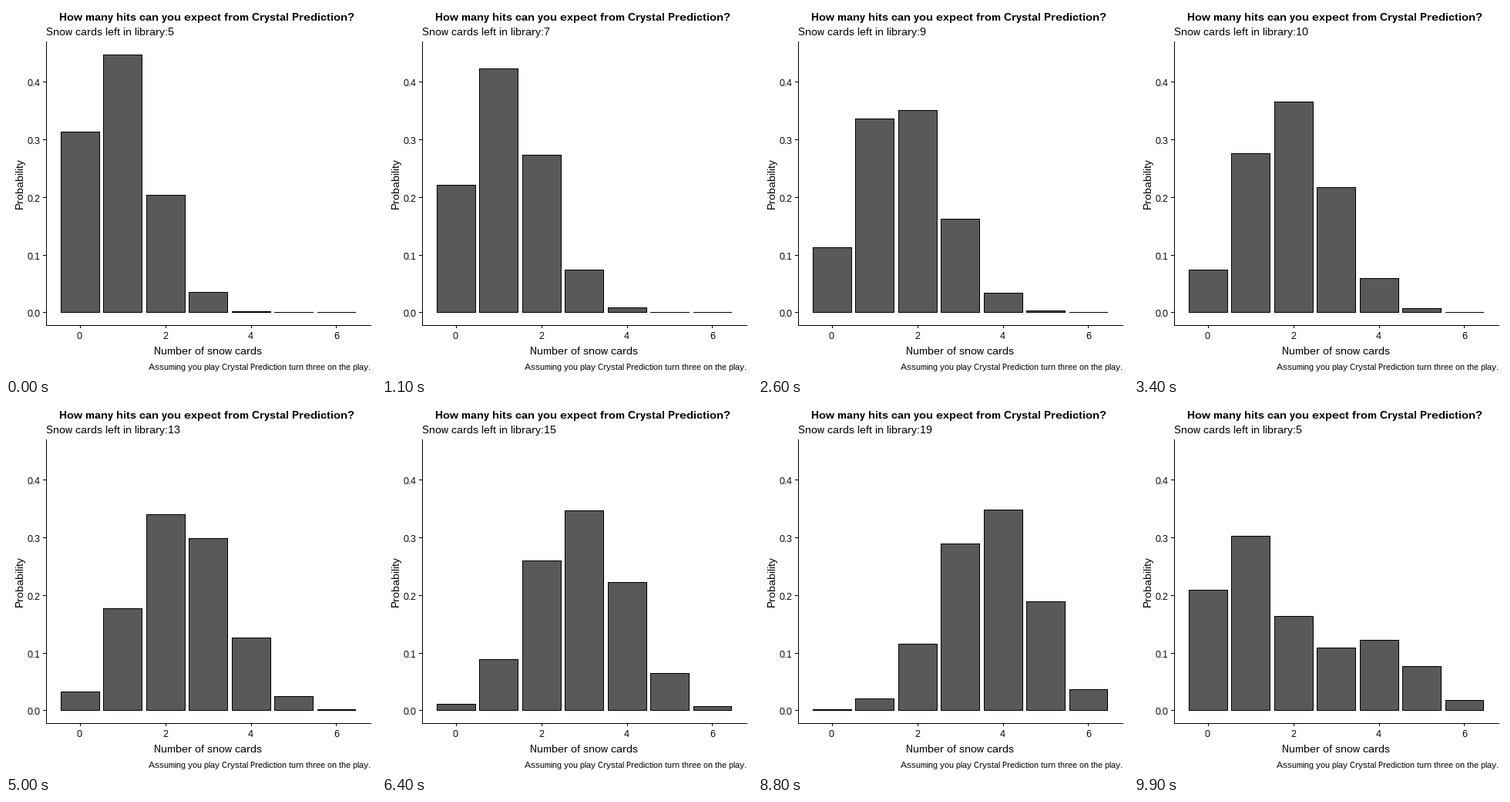
A matplotlib script that plays this animation: 480x480 px, repeating every 10000 ms.

```python
import math

import matplotlib.pyplot as plt
from matplotlib.animation import FuncAnimation
from matplotlib.patches import Rectangle

SIZE, DPI = 480, 96
FRAMES, INTERVAL = 100, 100
LIBRARY, LOOKS = 31, 6
CARD = "Crystal Prediction"

# Pixel scales of the plot panel
BASE, Y_UNIT = 397.88, 748.4
LEFT, X_UNIT, WIDTH = 71.25, 55.46, 0.9

# Snow card counts, and the frame in which each begins to give way to the next
COUNTS = list(range(5, 21))
STARTS = [4, 11, 18, 25] + list(range(32, 99, 6))
STEPS = 3

# Whole-pixel glyph hinting and spacing
plt.rcParams.update({
    "font.family": "Liberation Sans",
    "text.hinting": "native",
    "text.hinting_factor": 1,
    "text.kerning_factor": 6,
})
fig = plt.figure(figsize=(SIZE / DPI, SIZE / DPI), dpi=DPI, facecolor="white")
ax = fig.add_axes([0, 0, 1, 1])
ax.set_xlim(0, SIZE)
ax.set_ylim(SIZE, 0)
ax.axis("off")


def box(x, y, w, h, color="black"):
    return ax.add_patch(Rectangle((x, y), w, h, facecolor=color,
                                  linewidth=0, antialiased=False))


def label(x, y, text, px=14, ha="left", **kw):
    return ax.text(x, y, text, fontsize=px * 72 / DPI, ha=ha,
                   va="baseline", color="black", **kw)


def row(p):
    return math.floor(BASE - Y_UNIT * p)


def chances(snow):
    """Hypergeometric probabilities of 0 to 6 hits."""
    total = math.comb(LIBRARY, LOOKS)
    return [math.comb(snow, k) * math.comb(LIBRARY - snow, LOOKS - k) / total
            for k in range(LOOKS + 1)]


def state(frame):
    """Snow count to show and the bar values, tweened linearly."""
    i = sum(s <= frame for s in STARTS)
    if i == 0:
        return COUNTS[0], chances(COUNTS[0])
    old, new = COUNTS[i - 1], COUNTS[i % len(COUNTS)]
    t = min((frame - STARTS[i - 1] + 1) / STEPS, 1)
    return new, [a + (b - a) * t for a, b in zip(chances(old), chances(new))]


# Axes
box(52, 46, 1, 369)
box(52, 414, 422, 1)
for n in range(5):
    y = row(n / 10)
    box(48, y, 4, 1)
    label(28, y + 6, f"{n / 10:.1f}", 12)
for n in range(0, 7, 2):
    x = LEFT + X_UNIT * (n + WIDTH / 2)
    box(math.floor(x), 415, 1, 3)
    label(math.floor(x - 3.5), 432, str(n), 12)

# Text
label(69, 19, f"How many hits can you expect from {CARD}?", fontweight="bold")
subtitle = label(52, 38, "")
label(262, 452, "Number of snow cards", ha="center")
label(22, 230, "Probability", ha="center", rotation=90,
      rotation_mode="anchor")
label(473, 472, f"Assuming you play {CARD} turn three on the play.", 11,
      ha="right")

# Each bar is a black box with a grey one inside
bars = []
for k in range(LOOKS + 1):
    x0 = math.floor(LEFT + X_UNIT * k)
    x1 = math.floor(LEFT + X_UNIT * (k + WIDTH))
    bars.append((box(x0, 0, x1 - x0 + 1, 1),
                 box(x0 + 1, 0, x1 - x0 - 1, 1, "#595959")))


def draw(frame):
    count, values = state(frame)
    subtitle.set_text(f"Snow cards left in library:{count}")
    floor = row(0)
    for (outer, inner), p in zip(bars, values):
        top = row(p)
        outer.set_y(top)
        outer.set_height(floor + 1 - top)
        inner.set_y(top + 1)
        inner.set_height(max(floor - top - 1, 0))
        inner.set_visible(floor - top > 1)
    return []


anim = FuncAnimation(fig, draw, frames=FRAMES, interval=INTERVAL,
                     init_func=lambda: draw(0), repeat=True, repeat_delay=0)
plt.show()
```
